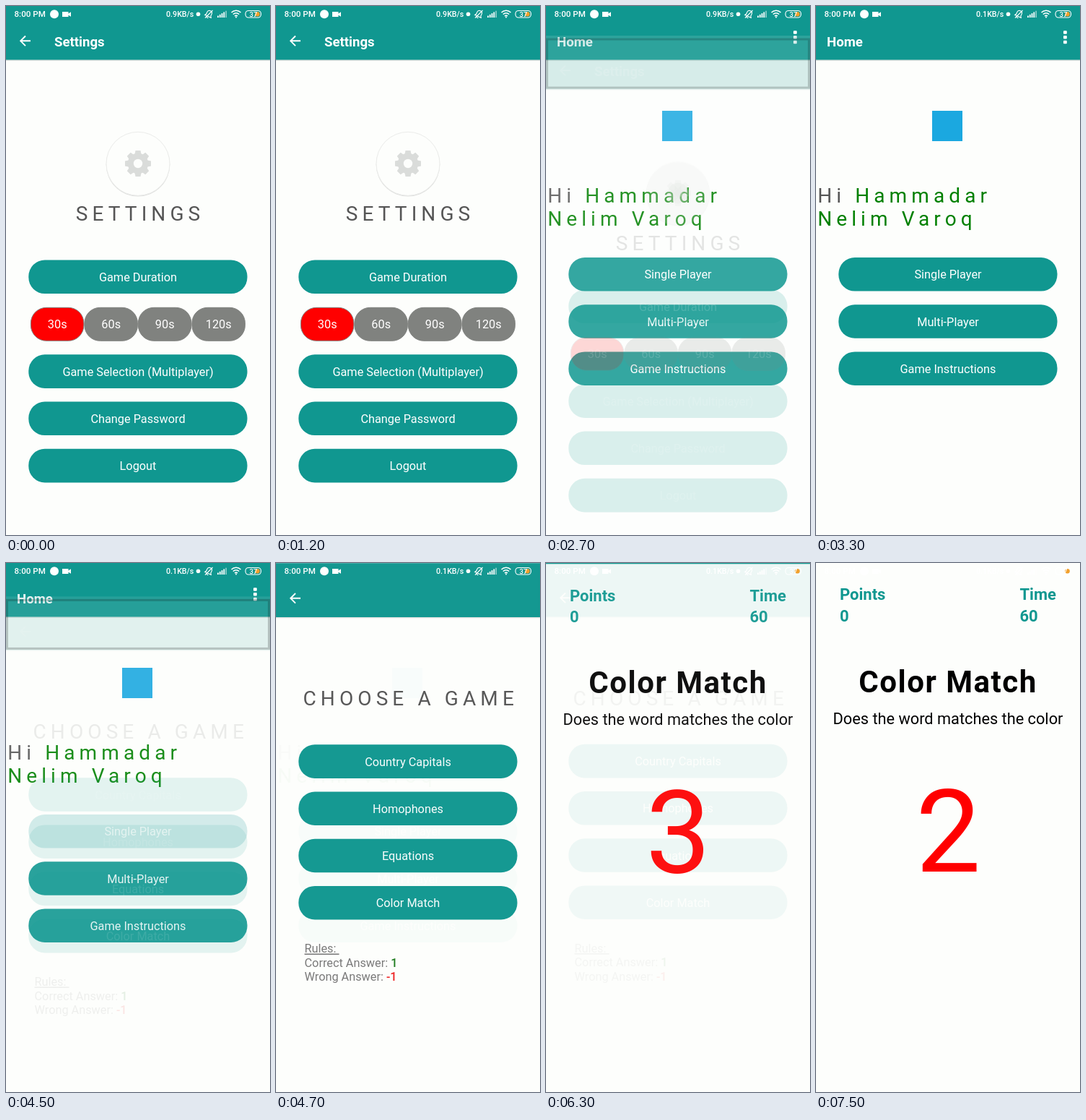
An HTML page that plays this animation: 366x732 px, repeating every 8000 ms.

```html
<!DOCTYPE html>
<html lang="en">
<head>
<meta charset="utf-8">
<title>Quiz app</title>
<style>
  html, body { margin: 0; width: 100%; height: 100%; overflow: hidden; background: #fdfefc; }
  svg { display: block; width: 366px; height: 732px; font-family: Roboto, sans-serif; }
  text { white-space: pre; }
  /* Each shape fades by itself, as the phone draws it. */
  .body :is(rect, text, path, circle) { opacity: var(--fade); }
</style>
</head>
<body>
<svg id="stage" viewBox="0 0 366 732"></svg>
<script>
const LOOP = 8000, STEP = 100, DROP = 58.6;
const TEAL = '#109790', PAPER = '#fdfefc', GREY = '#555';
const stage = document.getElementById('stage');

const text = (x, y, str, size, fill = '#fff', extra = '') =>
  `<text x="${x}" y="${y}" font-size="${size}" fill="${fill}" ${extra}>${str}</text>`;
const middle = 'text-anchor="middle"';
const bold = 'font-weight="700"';
const spaced = 'letter-spacing="6.1"';

const button = (y, label, id = '') => `<g id="${id}">
  <rect x="31.3" y="${y}" width="303.2" height="46.6" rx="22.5" fill="${TEAL}"/>
  ${text(183, y + 29.4, label, 16.3, '#fff', middle)}</g>`;

const option = (label, i) => `
  <rect x="${34.4 + i * 74.5}" y="417.3" width="73.5" height="46" rx="21.5"
    fill="${i ? '#80827f' : '#f00'}" stroke="#80827f"/>
  ${text(71.2 + i * 74.5, 446.2, label, 16.3, '#fff', middle)}`;

const header = content => `
  <rect width="366" height="76" fill="#000" fill-opacity=".1"/>
  <rect width="366" height="74.5" fill="${TEAL}"/>${content}`;

const backArrow = `<path d="M34 48.3H20.5M27 41.5l-6.8 6.8 6.8 6.8" fill="none" stroke="#fff" stroke-width="1.9"/>`;

// The edge is the header's elevation shadow, seen only while the screen is see-through.
const screen = (id, content, hasEdge = true) => `<g id="${id}">
  <g class="body"><rect width="366" height="732" fill="${PAPER}"/>${content}</g>
  ${hasEdge ? '<rect class="edge" x="1.5" y="5" width="363" height="67" fill="none" stroke="#000" stroke-width="3"/>' : ''}
</g>`;

const gear = `
  <circle cx="183" cy="219.3" r="44.3" fill="#000" fill-opacity=".13"/>
  <circle cx="183" cy="218.3" r="44" fill="${PAPER}" stroke="#ebecea"/>
  <g transform="translate(183 218)" fill="#dadcda">
    ${[0, 45, 90, 135].map(a => `<path transform="rotate(${a})" d="M-4.5-13l1-5h7l1 5v26l-1 5h-7l-1-5z"/>`).join('')}
    <circle r="14.2"/><circle r="6.2" fill="${PAPER}"/>
  </g>`;

const home = screen('home', header(
    text(15, 55.8, 'Home', 18.6, '#fff', bold) +
    [36.5, 43.3, 50].map(y => `<rect x="343" y="${y - 2.3}" width="4.8" height="4.6" rx="1" fill="#fff"/>`).join('')) +
  `<rect x="161" y="145" width="42" height="42" fill="#1ba8e0"/>` +
  text(2.2, 272, 'Hi <tspan fill="green">Hammadar</tspan>', 28, GREY, spaced) +
  text(2.2, 303.7, 'Nelim Varoq', 28, 'green', spaced) +
  button(348, 'Single Player', 'single') +
  button(413.2, 'Multi-Player') +
  button(478.4, 'Game Instructions'));

const choose = screen('choose', header(backArrow) +
  text(37.5, 197, 'CHOOSE A GAME', 28, GREY, spaced) +
  button(250.8, 'Country Capitals') +
  button(316, 'Homophones') +
  button(381.2, 'Equations') +
  button(446.4, 'Color Match', 'match') +
  text(39.5, 539, 'Rules: ', 16.3, '#777', 'text-decoration="underline"') +
  text(39.5, 558.2, 'Correct Answer: <tspan fill="#1c7a1c" font-weight="500">1</tspan>', 16.3, '#777') +
  text(39.5, 577.5, 'Wrong Answer: <tspan fill="#e22" font-weight="500">-1</tspan>', 16.3, '#777'));

const game = screen('game',
  text(33, 51.3, 'Points', 22, TEAL, bold) + text(33, 80.5, '0', 22, TEAL, bold) +
  text(282.5, 51.3, 'Time', 22, TEAL, bold) + text(282.5, 80.5, '60', 22, TEAL, bold) +
  text(59.3, 178.8, 'Color Match', 42, '#000', bold + ' letter-spacing="1.5"') +
  text(183, 222.8, 'Does the word matches the color', 21.75, '#000', middle) +
  text(183.3, 427, '3', 160.5, '#f00', middle + ' id="count"'), false);

const settings = screen('settings', header(
    backArrow + text(67, 55.8, 'Settings', 18.6, '#fff', bold)) +
  gear +
  text(96.8, 297.3, 'SETTINGS', 28, GREY, spaced) +
  button(351.5, 'Game Duration') +
  ['30s', '60s', '90s', '120s'].map(option).join('') +
  button(482.3, 'Game Selection (Multiplayer)') +
  button(547.5, 'Change Password') +
  button(612.8, 'Logout'));

const statusBar = `<g fill="#fff">
  ${text(11.5, 15.4, '8:00 PM', 11.6, '#fff', 'font-weight="500"')}
  <circle cx="67" cy="11.3" r="6"/>
  <path d="M78 8h8.5v2.5l3.5-2.2v6.4l-3.5-2.2V15H78z"/>
  ${text(222, 15.2, '0.9KB/s', 10.7, '#fff', 'font-weight="500" id="speed"')}
  <circle cx="266.5" cy="11.3" r="2.8"/>
  <g fill="none" stroke="#fff" stroke-width="1.1">
    <path d="M276.5 14.5h9.5l-1.4-2V9.5a3.4 3.4 0 0 0-6.8 0v3zM280 16.5h2.5" transform="rotate(25 281 11.5)"/>
    <path d="M276 16.5l10.5-10.5"/>
    <path d="M312.5 9a9 9 0 0 1 13 0M314.8 11.5a6 6 0 0 1 8.4 0M317 14a3 3 0 0 1 4 0" stroke-width="1.5"/>
    <rect x="332" y="6.5" width="21.5" height="9.5" rx="4.2"/>
  </g>
  ${[0, 1, 2, 3, 4].map(i => `<rect x="${293 + i * 2.8}" y="${13.5 - i * 1.7}" width="1.8" height="${2.5 + i * 1.7}" opacity="${i < 4 ? 1 : .5}"/>`).join('')}
  <circle cx="319" cy="15.6" r="1"/>
  <circle cx="348.5" cy="11.2" r="3.3" fill="#f2a02c"/>
  ${text(337.5, 14.6, '37', 9.5, '#fff', 'font-weight="500"')}
</g>`;

stage.innerHTML = home + choose + game + settings + statusBar;
const get = id => document.getElementById(id);
const clamp = v => Math.min(1, Math.max(0, v));

const opening = (t, start) => 1 - (1 - clamp((t - start) / 350)) ** 5;
const closing = (t, start) => 1 - clamp((t - start) / 150);
const fade = p => p < .5 ? p / 2 : p < .9 ? .25 + (p - .5) * 1.125 : .7 + (p - .9) * 3;
const pressed = (t, down, up) => 1 - .8 * (clamp((t - down) / 150) - clamp((t - up) / 250));

function place(id, p) {
  const el = get(id), edge = el.querySelector('.edge');
  el.setAttribute('display', p > 0 ? 'inline' : 'none');
  el.setAttribute('transform', `translate(0 ${DROP * (1 - p)})`);
  el.style.setProperty('--fade', fade(p));
  if (edge) edge.setAttribute('opacity', .25 * (1 - p));
}

function draw(t) {
  place('home', 1);
  place('settings', closing(t, 2595));
  place('choose', opening(t, 4484));
  place('game', opening(t, 6113));
  get('single').setAttribute('opacity', pressed(t, 4150, 4500));
  get('match').setAttribute('opacity', pressed(t, 5830, 6110));
  get('speed').textContent = t < 3000 ? '0.9KB/s' : '0.1KB/s';
  get('count').textContent = t < 7200 ? 3 : 2;
}

const begin = performance.now();
function tick() {
  const t = (performance.now() - begin) % LOOP;
  draw(Math.floor(t / STEP) * STEP);
  requestAnimationFrame(tick);
}
tick();
</script>
</body>
</html>
```
